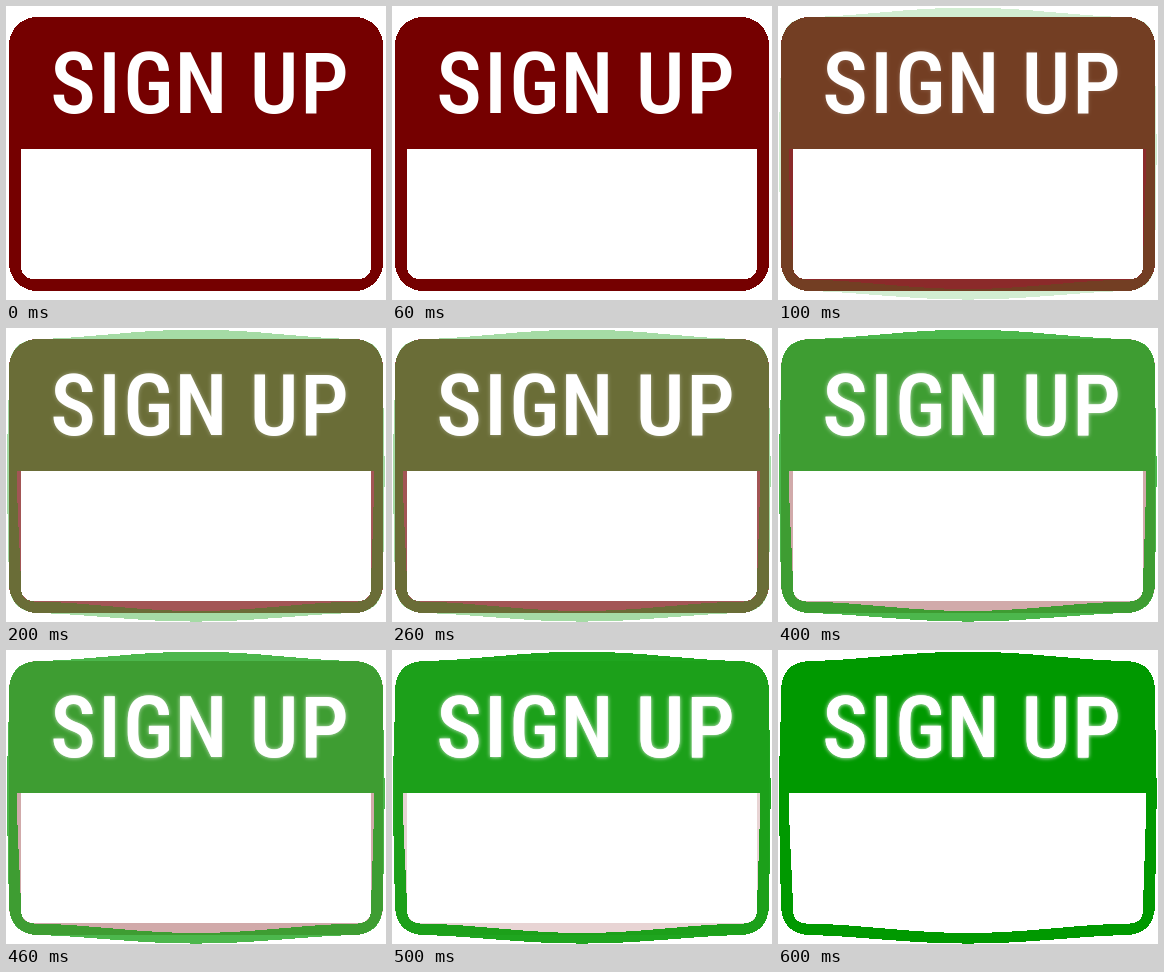
Recreate the animation shown at these times as an HTML page. Size 380x294 px, loop 0.7 s.

```html
<!DOCTYPE html>
<html lang="en">
<head>
<meta charset="utf-8">
<title>Sign up</title>
<style>
  html, body { margin: 0; width: 100%; height: 100%; overflow: hidden; background: #fff; }
  svg { display: block; }
  path { fill-rule: evenodd; shape-rendering: crispEdges; }
  text { font: 500 86px "Roboto Condensed", Roboto, sans-serif; font-variation-settings: "wdth" 88; text-anchor: middle; fill: #fff; }
  #glow { filter: drop-shadow(0 0 2px #fff); }
</style>
</head>
<body>
<svg width="380" height="294" viewBox="0 0 380 294">
  <defs>
    <!-- each letter is centred on its own x -->
    <text id="label" x="67 103.5 142.5 195 231 268 318.5" y="106.5">SIGN UP</text>
  </defs>
  <path id="straight" fill="#750000" d="
    M31 11H349A28 28 0 0 1 377 39V257A28 28 0 0 1 349 285H31A28 28 0 0 1 3 257V39A28 28 0 0 1 31 11Z
    M15 143V261A12 12 0 0 0 27 273H353A12 12 0 0 0 365 261V143Z"/>
  <path id="bulged" fill="#009900" d="
    M30 11C80 10.5 130 1.6 190 1.6S300 10.5 350 11Q376 13 377 40C377 80 378.7 110 378.7 147S377 220 377 257Q375 284 349 285
    C300 286 250 293.6 190 293.6S80 286 31 285Q5 284 3 257C3 220 .7 184 .7 147S3 80 3 40Q4 13 30 11Z
    M11 143C11 190 14.5 225 15 261Q16 273 28 273.5C80 274 130 283 190 283S300 274 352 273.5Q364 273 365 261C365.5 225 368 190 368 143Z"/>
  <use id="glow" href="#label"/>
  <use href="#label"/>
</svg>
<script>
  const STEP = 100, COUNT = 7;
  const [straight, bulged, glow] = ["straight", "bulged", "glow"].map(id => document.getElementById(id));

  // Stepped cross-fade; the bulged sign comes in slightly faster
  function draw() {
    const mix = Math.floor(performance.now() / STEP) % COUNT / (COUNT - 1);
    straight.style.opacity = 1 - mix;
    bulged.style.opacity = glow.style.opacity = Math.min(1, mix * 1.055);
    requestAnimationFrame(draw);
  }
  draw();
</script>
</body>
</html>
```
